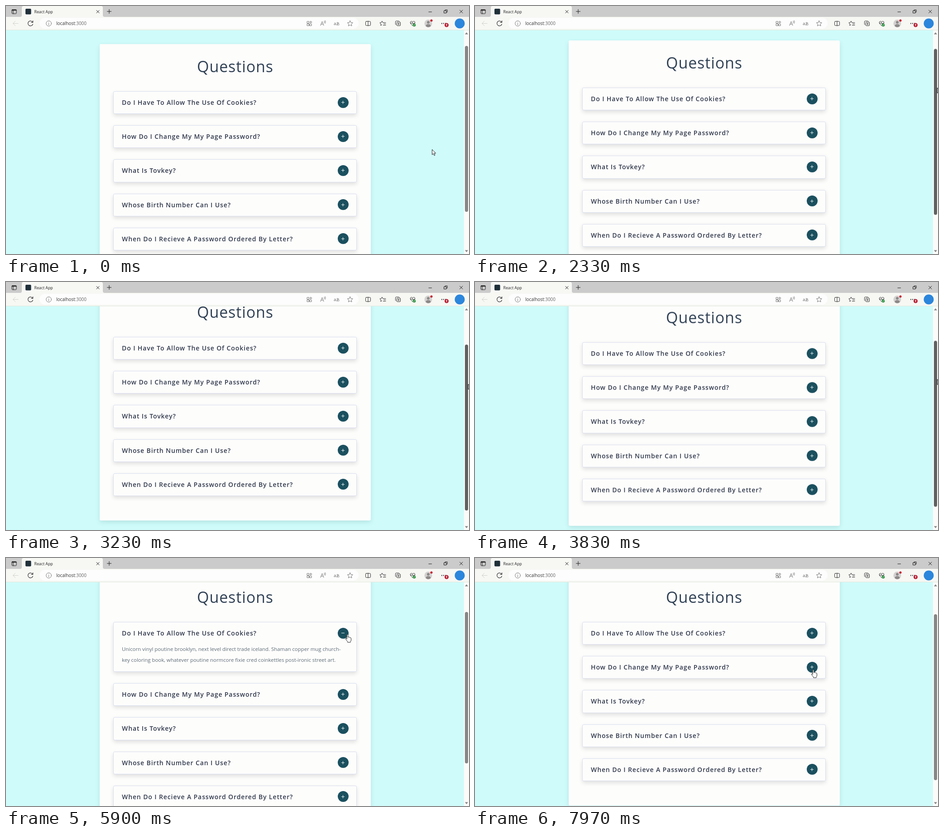
Recreate the animation shown at these times as an HTML page. Size 1023x547 px, loop 8 s.

```html
<!DOCTYPE html>
<html lang="en">
<head>
<meta charset="utf-8">
<title>Questions</title>
<style>
html, body { margin: 0; width: 100%; height: 100%; overflow: hidden; }
body { position: relative; background: #cffcfb; font-family: "Open Sans", "Noto Sans", sans-serif; }
.anim { animation: 8s linear infinite; }
.step { animation: 8s step-end infinite; }

/* page */
.view { position: absolute; left: 0; top: 53px; width: 1012px; height: 494px; overflow: hidden; }
.page {
  position: absolute; left: 207px; top: 31px; width: 599px; box-sizing: border-box;
  padding: 104px 31px 29px 30px; background: #fdfdfc; border-radius: 3px;
  box-shadow: 0 4px 11px rgba(0, 60, 70, .13); animation-name: scroll;
}
h1 {
  position: absolute; left: 0; top: 29px; width: 100%; margin: 0; text-align: center;
  font-size: 34px; font-weight: 400; line-height: 40px; letter-spacing: .9px; color: #2f4054;
}
.card {
  position: relative; height: 50.2px; margin-bottom: 25px; box-sizing: border-box;
  border: 1px solid #dbdff0; border-radius: 3px; background: #fdfdfc;
  box-shadow: 0 4px 10px rgba(0, 0, 0, .12);
}
.card.first { animation-name: grow; }
h2 {
  position: absolute; left: 18px; top: -1px; margin: 0; white-space: nowrap;
  font-size: 14px; font-weight: 600; line-height: 50px; letter-spacing: .89px; color: #30384b;
}
.card p {
  position: absolute; left: 18px; top: 47px; margin: 0; white-space: nowrap; visibility: hidden;
  font-size: 11.4px; line-height: 24.1px; color: #5f6c76; animation-name: reveal;
}
.btn { position: absolute; right: 17.5px; top: 11.5px; width: 24px; height: 24px; border-radius: 50%; background: #1b505f; }
.btn::before, .btn::after { content: ""; position: absolute; background: #e6f1f2; }
.btn::before { left: 8.5px; top: 11.5px; width: 7px; height: 1px; }
.btn::after { left: 11.5px; top: 8.5px; width: 1px; height: 7px; }
.first .btn::after { animation: conceal 8s step-end infinite; }

/* scrollbar */
.bar { position: absolute; left: 1012px; top: 53px; width: 11px; height: 494px; background: #fbfbfa; }
.thumb { position: absolute; left: 2px; top: 35px; width: 7px; animation-name: thumb; }
.thumb i { display: block; height: 366px; border-radius: 4px; background: #868686; animation-name: grip; }

svg { position: absolute; left: 0; top: 0; overflow: hidden; }
.cursor { position: absolute; left: 0; top: 0; animation-name: pointer; }
.cursor svg { overflow: visible; }
.arrow { animation-name: arrow; }
.hand { visibility: hidden; animation-name: hand; }

@keyframes scroll {
  0%, 28% { transform: translateY(0); }
  29.125% { transform: translateY(-8px); }
  37%, 42% { transform: translateY(-67px); }
  51.5%, 53% { transform: translateY(-48px); }
  54%, 100% { transform: translateY(-47px); }
}
@keyframes thumb {
  0%, 28% { transform: translateY(0); }
  29.125% { transform: translateY(6.5px); }
  37%, 42% { transform: translateY(50px); }
  51.5%, 53% { transform: translateY(36.5px); }
  54%, 69.37% { transform: translateY(36px); }
  69.38%, 83.74% { transform: translateY(31px); }
  83.75%, 100% { transform: translateY(36px); }
}
@keyframes grip {
  0% { height: 366px; background: #868686; }
  27% { height: 366px; background: #606060; }
  55% { height: 366px; background: #868686; }
  69.38% { height: 334px; background: #868686; }
  83.75%, 100% { height: 366px; background: #868686; }
}
@keyframes grow { 0% { height: 50.2px; } 69.38% { height: 110.2px; } 83.75%, 100% { height: 50.2px; } }
@keyframes reveal { 0% { visibility: hidden; } 69.38% { visibility: visible; } 83.75%, 100% { visibility: hidden; } }
@keyframes conceal { 0% { visibility: visible; } 69.38% { visibility: hidden; } 83.75%, 100% { visibility: visible; } }
@keyframes pointer {
  0%, 19% { transform: translate(941px, 316px); animation-timing-function: ease-in-out; }
  26.5%, 28% { transform: translate(1021px, 173px); }
  29.125% { transform: translate(1021px, 180px); }
  37%, 42% { transform: translate(1021px, 225px); }
  51.5%, 55% { transform: translate(1021px, 208px); animation-timing-function: ease-in-out; }
  66%, 86% { transform: translate(754px, 168px); animation-timing-function: ease-in-out; }
  94%, 100% { transform: translate(747px, 246px); }
}
@keyframes arrow {
  0% { visibility: visible; } 65% { visibility: hidden; }
  87.5% { visibility: visible; } 92%, 100% { visibility: hidden; }
}
@keyframes hand {
  0% { visibility: hidden; } 65% { visibility: visible; }
  87.5% { visibility: hidden; } 92%, 100% { visibility: visible; }
}
</style>
</head>
<body>
<div class="view">
  <main class="page anim">
    <h1>Questions</h1>
    <section class="card first step">
      <h2>Do I Have To Allow The Use Of Cookies?</h2><span class="btn"></span>
      <p class="step">Unicorn vinyl poutine brooklyn, next level direct trade iceland. Shaman copper mug church-<br>key coloring book, whatever poutine normcore fixie cred coinkettles post-ironic street art.</p>
    </section>
    <section class="card"><h2>How Do I Change My My Page Password?</h2><span class="btn"></span></section>
    <section class="card"><h2>What Is Tovkey?</h2><span class="btn"></span></section>
    <section class="card"><h2>Whose Birth Number Can I Use?</h2><span class="btn"></span></section>
    <section class="card"><h2>When Do I Recieve A Password Ordered By Letter?</h2><span class="btn"></span></section>
  </main>
</div>
<div class="bar"><div class="thumb anim"><i class="step"></i></div></div>

<!-- browser window -->
<svg width="1023" height="547" fill="none" stroke="#444" stroke-linecap="round" stroke-linejoin="round">
  <g stroke="none">
    <path fill="#cbcbcb" d="M0 0H1023V25H0Z"/>
    <path fill="#f7f7f4" d="M0 24H31Q35 24 35 20V4Q35 0 39 0H210Q214 0 214 4V20Q214 24 218 24H1023V53H0Z"/>
    <path fill="#dfe8dc" d="M0 52.500H1023V53.500H0Z"/>
    <rect x="74" y="26" width="705" height="24" rx="12" fill="#fdfdfd"/>
    <rect x="43" y="6" width="12.5" height="12.5" rx="2" fill="#20303a"/>
    <circle cx="1002.5" cy="38.5" r="11" fill="#2b86dc"/>
    <path fill="#858585" d="M1014 62.5h7l-3.5-4.5ZM1014 538.5h7l-3.5 4.5Z"/>
    <text x="62.500" y="15.500" font-size="8.8" fill="#222">React App</text>
    <text x="111" y="42" font-size="9.94" fill="#333">localhost<tspan fill="#666">:3000</tspan></text>
  </g>

  <!-- tab strip -->
  <g stroke="#1c1c1c">
    <rect x="13" y="8" width="10" height="9" rx="1.500"/>
    <path stroke-width="2" d="M13.500 9H22.500"/>
    <path d="M16 9V17"/>
    <path d="M200 9.500l6 6m0-6l-6 6M223.500 12h9m-4.500-4.500v9M934 13h6.500M1002.500 9l6.500 6.500m0-6.500l-6.500 6.500"/>
    <path d="M968 10.500h5v5h-5ZM970 10V8.500h5v5h-1.500"/>
  </g>

  <!-- toolbar -->
  <path stroke="#d2d2cc" d="M27 38.500H15.500m5-5l-5 5l5 5"/>
  <path stroke="#333" stroke-width="1.200" d="M59 36a5.500 5.500 0 1 0 .3 4M59.500 32.500V36.200H55.800"/>
  <g stroke="#777">
    <circle cx="94.500" cy="38.500" r="5.800"/>
    <path d="M94.500 38v3.500M94.500 35.500v.2"/>
    <path d="M665.500 34h4v4h-4ZM665.500 39.500h4v4h-4ZM671 39.500h4v4h-4ZM673.500 33v5M671 35.500h5"/>
    <path d="M695 43l3.500-9l3.500 9m-5.700-3h4.400M703 33.500q1.500 1.500 0 3.500M705 32q2.500 3 0 6.500"/>
    <path d="M760.300 32.500l1.800 3.900 4.200.5-3.100 2.900.8 4.200-3.700-2.100-3.700 2.100.8-4.200-3.100-2.900 4.200-.5Z"/>
  </g>
  <text x="724" y="41.500" font-size="9.500" fill="#666" stroke="none" font-family="'Noto Sans', 'Noto Sans CJK JP', sans-serif">a<tspan font-size="8">あ</tspan></text>
  <g stroke="#333">
    <rect x="794.500" y="34" width="11" height="9" rx="1.500"/><path d="M800 33v11"/>
    <path d="M830.500 41.500l-2.700 1.500.6-3.500-2.600-2.400 3.400-.5 1.700-3.400 1.700 3.400H839M834.500 39.500h4.500M833.500 42.500h5.500"/>
    <rect x="863.500" y="35.500" width="8" height="8" rx="1.500"/>
    <path d="M861.500 41.500q-1-.5-1-1.500v-5q0-2 2-2h5q1.200 0 1.700 1M867.500 37.500v4m-2-2h4"/>
    <path d="M898.500 43.500l-4.500-4.700q-2-3 .5-4.800q2.300-1.200 4 1q1.700-2.200 4-1q2.500 1.800.5 4.800M893.500 38h3l1.200-2 1.600 4 1.200-2h2"/>
  </g>
  <g stroke="none">
    <circle cx="902" cy="42" r="3.300" fill="#25913b"/>
    <circle cx="933" cy="38.500" r="8.500" fill="#d3d1d0"/>
    <circle cx="933" cy="36" r="3" fill="#8c8888"/>
    <path fill="#8c8888" d="M927.500 44.500q0-4.500 5.500-4.500t5.500 4.500q-5.500 4.500-11 0Z"/>
    <circle cx="940" cy="32" r="2.500" fill="#c5162e"/>
    <path fill="#333" d="M962 37.500h2v2h-2ZM966 37.500h2v2h-2ZM970 37.500h2v2h-2Z"/>
    <circle cx="973.500" cy="42" r="4.500" fill="#b81c30"/>
  </g>
  <path stroke="#fff" d="M900.500 42l1 1 2-2.200M973.500 44v-4m-1.500 1.500l1.500-1.500l1.500 1.500"/>
</svg>

<div class="cursor anim">
  <svg width="1" height="1" fill="#fff" stroke="#222" stroke-linejoin="round">
    <path class="arrow step" d="M.5.5V12l2.700-2.500 1.900 4.300 1.900-.8-1.900-4.200h3.500Z"/>
    <path class="hand step" d="M-.8 11V2q0-1.500 1.300-1.500T1.800 2v5q.2-1.200 1.300-1t1.200 1.300q.4-1 1.400-.6t1 1.300q1.800-.5 1.800 1.500v3.500q0 2-1.500 3.500v1.500H.8v-1.500l-4-5q-1.100-1.900.4-2.300t2 1.800Z"/>
  </svg>
</div>
</body>
</html>
```
